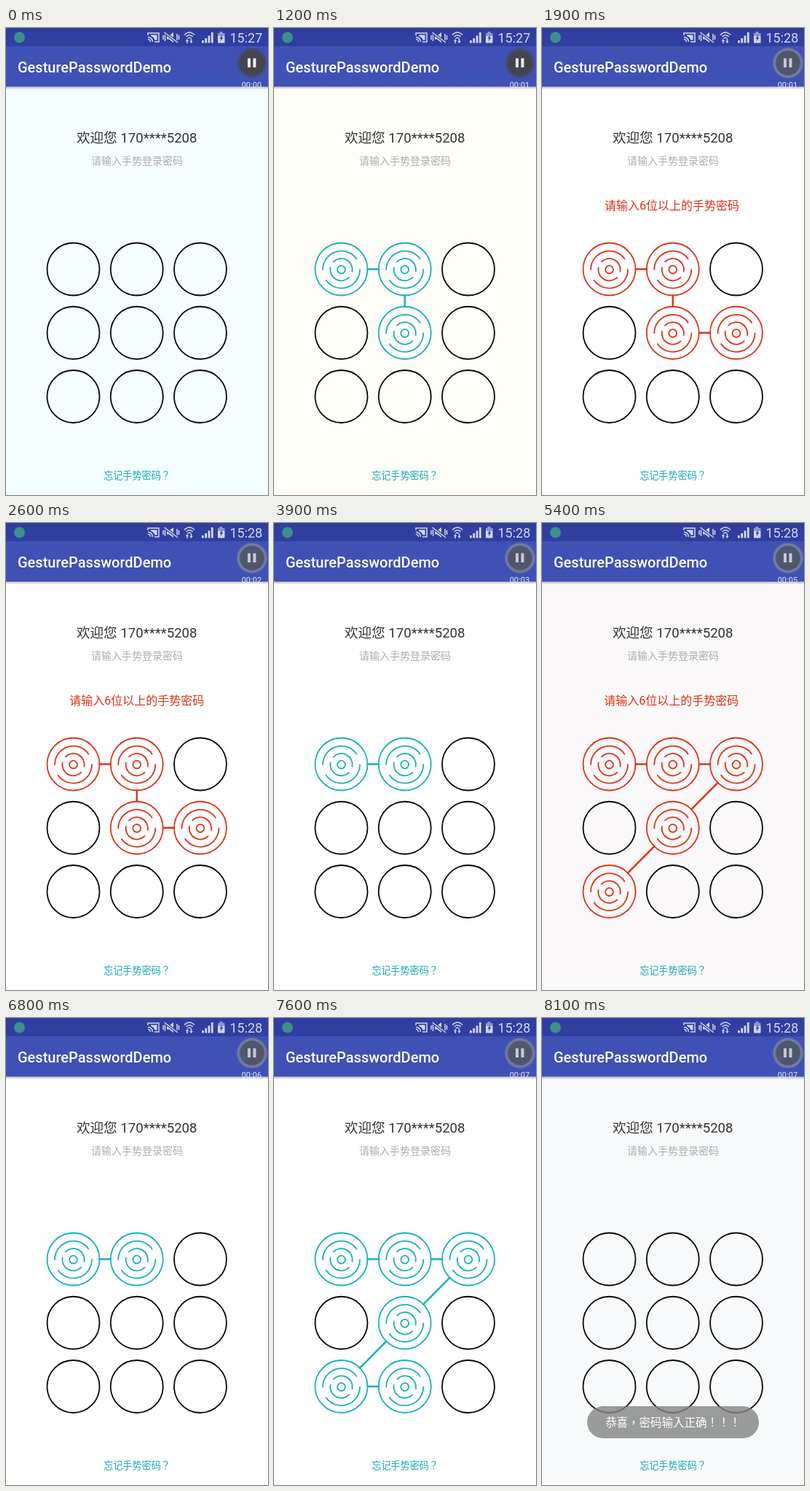
An HTML page for the animation above (8200 ms loop, 360 by 640 pixels).

```html
<!DOCTYPE html>
<html>
<head>
<meta charset="utf-8">
<style>
html, body { margin: 0; width: 100%; height: 100%; overflow: hidden; }
svg { display: block; width: 360px; height: 640px; }
text { font-family: Roboto, "Noto Sans CJK SC", sans-serif; }
.wide { font-family: "Noto Sans CJK TC", sans-serif; }
.line { fill: none; stroke-linecap: round; }
</style>
</head>
<body>
<svg viewBox="0 0 360 640">
  <defs>
    <linearGradient id="shade" x2="0" y2="1">
      <stop stop-opacity=".24"/><stop offset="1" stop-opacity="0"/>
    </linearGradient>
    <radialGradient id="dark">
      <stop offset=".72" stop-color="#43454c"/>
      <stop offset="1" stop-color="#43454c" stop-opacity="0"/>
    </radialGradient>
    <radialGradient id="light">
      <stop offset=".72" stop-color="#50566b"/>
      <stop offset=".84" stop-color="#7b83a6"/>
      <stop offset="1" stop-color="#7b83a6" stop-opacity="0"/>
    </radialGradient>
    <clipPath id="bar"><path d="M0 0H360V82H0Z"/></clipPath>
  </defs>
  <rect id="page" width="360" height="640"/>

  <!-- header -->
  <rect y="80.500" width="360" height="4" fill="url(#shade)"/>
  <rect width="360" height="80.500" fill="#3f51b5"/>
  <rect width="360" height="25" fill="#303f9f"/>
  <circle cx="18.500" cy="13" r="7.500" fill="#3b8f8c"/>
  <text x="16" y="61" font-size="20" font-weight="500" fill="#fff">GesturePasswordDemo</text>

  <!-- status icons -->
  <g fill="none" stroke="#d3d7ec" stroke-width="1.500">
    <path d="M195 10V7H210V19H204M195 12.500a6.500 6.500 0 0 1 6.500 6.500M195 15.500a3.500 3.500 0 0 1 3.500 3.500"/>
    <path d="M216 10v6M218.500 8v10M235 8v10M237.500 10v6"/>
    <path d="M245 9.500Q252 2.500 259 9.500M247.500 12Q252 7.500 256.500 12M249.500 14.500Q252 12 254.500 14.500"/>
  </g>
  <g fill="#d3d7ec">
    <path d="M199 9.500H207.500V16.500H204.500Q203 12 199 11Z"/>
    <path d="M221 10.500h3l6-4.500v14l-6-4.500h-3z"/>
    <path d="M249 15.500v5M249 15l2.200 3h-1.400v3h-1.600v-3h-1.400zM254.500 21l-2.200-3h1.400v-3h1.600v3h1.400z"/>
    <path d="M269 17h2.800v3.500H269zM273.300 14h2.800v6.500h-2.800zM277.600 10.500h2.800v10h-2.800zM281.900 6h2.800v14.500h-2.800z"/>
    <path d="M291 11h9.500v9.500H291z"/>
  </g>
  <path d="M293.500 5h4v2h3v4H291V7h2.500z" fill="#8d97cf"/>
  <path d="M297.200 9l-3.700 5.500h2l-.8 4 3.800-5.500h-2.100z" fill="#303f9f"/>
  <path d="M217.500 6L236 20" stroke="#303f9f" stroke-width="4"/>
  <path d="M217.500 6L236 20" stroke="#d3d7ec" stroke-width="1.500"/>
  <text id="clock" x="307.500" y="20" font-size="18" fill="#d3d7ec"></text>

  <!-- recorder -->
  <circle id="knob" cx="338" cy="48" r="22"/>
  <path id="pause" d="M332 41.500h4v12.500h-4zM339.500 41.500h4v12.500h-4z"/>
  <g clip-path="url(#bar)"><text id="timer" x="323.700" y="82" font-size="11" fill="#e8eaf6"></text></g>

  <!-- prompts -->
  <g text-anchor="middle">
    <text x="179.700" y="157" font-size="18.600" fill="#333">欢迎您 170****5208</text>
    <text x="180" y="187" font-size="14" fill="#adadad">请输入手势登录密码</text>
    <text id="error" y="249" font-size="16" fill="#df3417">请输入6位以上的手势密码</text>
    <text x="180" y="618" font-size="13.100" fill="#18a9ba" class="wide">忘记手势密码？</text>
  </g>

  <g id="grid" class="line"></g>
  <path id="links" class="line" stroke-width="2.400"/>

  <g id="toast">
    <rect x="62" y="532" width="236" height="44" rx="22" fill="#848484" fill-opacity=".8"/>
    <text x="180" y="560" font-size="15.500" fill="#fff" text-anchor="middle" class="wide">恭喜，密码输入正确！！！</text>
  </g>
</svg>
<script>
const LOOP = 8200, RADIUS = 36, PITCH = 87.25;
const CYAN = '#18afc2', RED = '#df3417', BLACK = '#080808';
const $ = id => document.getElementById(id);

// cells in touch order, first touch, time per cell, release, clear
const strokes = [
  { cells: [0, 1, 4, 5], start: 800, step: 200, release: 1600, clear: 2900 },
  { cells: [0, 1, 2, 4, 6], start: 3600, step: 200, release: 4500, clear: 5900 },
  { cells: [0, 1, 2, 4, 6, 7, 8], start: 6500, step: 200, release: 7800, clear: 7800 }
];
const tints = [[0, '#f4fdff'], [800, '#fefdf7'], [1600, '#ffffff'],
  [4500, '#faf8f9'], [5900, '#ffffff'], [7800, '#f7f9fb']];

const center = i => [92.5 + PITCH * (i % 3), 330.5 + PITCH * Math.floor(i / 3)];

function arc(r, from, to) {
  const at = a => [r * Math.cos(a * Math.PI / 180), r * Math.sin(a * Math.PI / 180)].map(v => v.toFixed(2));
  return `M${at(from)}A${r} ${r} 0 ${to - from > 180 ? 1 : 0} 1 ${at(to)}`;
}

const swirl = arc(25.5, 180, 325) + arc(25.5, 0, 145) + arc(15.2, 225, 370) + arc(15.2, 45, 190);
const cells = Array.from({ length: 9 }, (_, i) => {
  const make = (tag, attrs, parent) => {
    const el = document.createElementNS('http://www.w3.org/2000/svg', tag);
    for (const k in attrs) el.setAttribute(k, attrs[k]);
    return parent.appendChild(el);
  };
  const g = make('g', { transform: `translate(${center(i)})`, 'stroke-width': 1.8 }, $('grid'));
  make('circle', { r: RADIUS }, g);
  const inner = make('g', { transform: 'translate(0 .6)' }, g);
  make('circle', { r: 5.4 }, inner);
  make('path', { d: swirl }, inner);
  return { g, inner };
});

// segment between two cells, leaving out the circles
function link(a, b) {
  const [x1, y1] = center(a), [x2, y2] = center(b);
  const k = RADIUS / Math.hypot(x2 - x1, y2 - y1);
  const dx = (x2 - x1) * k, dy = (y2 - y1) * k;
  return `M${x1 + dx} ${y1 + dy}L${x2 - dx} ${y2 - dy}`;
}

function render(t) {
  const stroke = strokes.find(s => t >= s.start && t < s.clear);
  const failed = !!stroke && t >= stroke.release;
  const color = failed ? RED : CYAN;
  const hit = stroke ? stroke.cells.slice(0, Math.floor((t - stroke.start) / stroke.step) + 1) : [];

  $('page').setAttribute('fill', tints.filter(s => t >= s[0]).pop()[1]);
  cells.forEach(({ g, inner }, i) => {
    const on = hit.includes(i);
    g.setAttribute('stroke', on ? color : BLACK);
    inner.setAttribute('visibility', on ? 'visible' : 'hidden');
  });
  $('links').setAttribute('d', hit.slice(1).map((c, i) => link(hit[i], c)).join(''));
  $('links').setAttribute('stroke', color);

  const p = failed ? Math.min((t - stroke.release) / 1000, 1) : 0;
  $('error').setAttribute('visibility', failed ? 'visible' : 'hidden');
  $('error').setAttribute('x', 179.8 - 2.1 * Math.sin(p * 14 * Math.PI));

  const idle = t >= 1700;
  $('knob').setAttribute('fill', idle ? 'url(#light)' : 'url(#dark)');
  $('pause').setAttribute('fill', idle ? '#c6cad8' : '#eceef4');
  $('clock').textContent = idle ? '15:28' : '15:27';
  $('timer').textContent = '00:0' + Math.max(0, Math.min(7, Math.floor((t - 100) / 1000)));
  $('toast').setAttribute('opacity', Math.max(0, Math.min(1, (t - 7800) / 300)));
}

const began = performance.now();
function tick() {
  render((performance.now() - began) % LOOP);
  requestAnimationFrame(tick);
}
tick();
</script>
</body>
</html>
```
